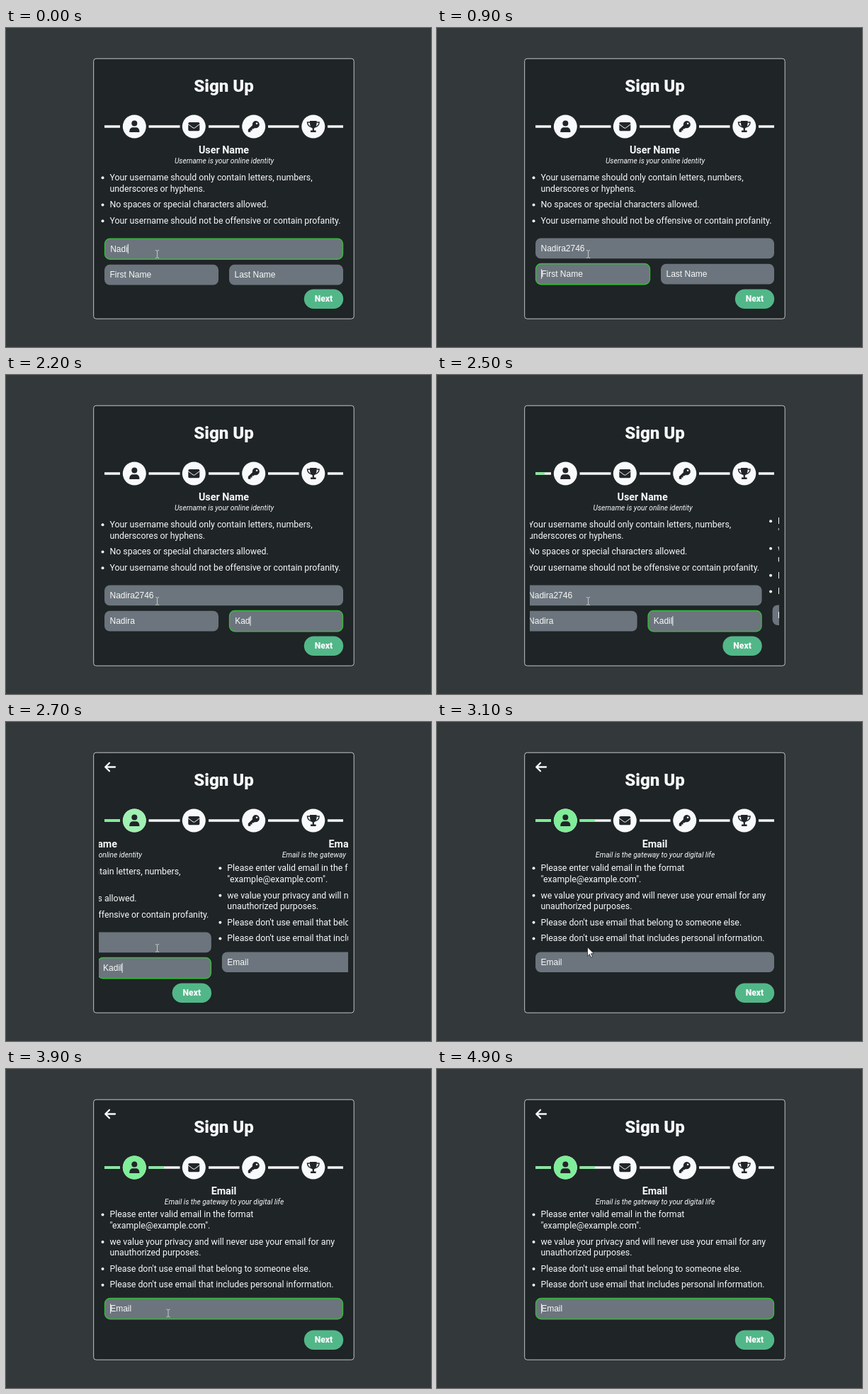
These frames come from a looping animation (600x450 px, 5000 ms). An HTML page:

```html
<!DOCTYPE html>
<html lang="en">
<head>
<meta charset="utf-8">
<title>Sign Up</title>
<style>
  html, body { margin: 0; width: 100%; height: 100%; overflow: hidden; background: #33383b; }
  svg { display: block; width: 600px; height: 450px; }
  text { font: 12.32px Roboto, "Open Sans", sans-serif; fill: #f8f9fa; white-space: pre; }
  .mid { text-anchor: middle; }
  .title { font-size: 24px; font-weight: 900; }
  .head { font-size: 14.3px; font-weight: 700; }
  .sub { font-size: 10.2px; font-style: italic; }
  .next { font-size: 12.1px; font-weight: 900; }
  .field text { font: 12px "Liberation Sans", Arial, sans-serif; }
  .field rect { fill: #6c757d; stroke-width: 1.4; }
  .icon { fill: #212529; }
</style>
</head>
<body>
<svg viewBox="0 0 600 450">
  <defs>
    <clipPath id="view"><rect x="131" y="150" width="352" height="255"/></clipPath>
    <clipPath id="done"><rect id="doneBox" x="138" y="130" height="18"/></clipPath>
    <path id="track" d="M139 139H161M201.5 139H245.5M286 139H329.5M370 139H413.5M454 139H476"/>
  </defs>
  <rect x="123.7" y="43.2" width="367.5" height="367" rx="3.5" fill="#1f2426" stroke="#c3c6c8"/>
  <text class="title mid" x="307.5" y="89.5">Sign Up</text>
  <path id="back" d="M154 63.5H140.5M146 57.7L140.2 63.5L146 69.3" fill="none" stroke="#f8f9fa" stroke-width="2.3" stroke-linecap="round" stroke-linejoin="round"/>

  <g stroke-width="3.5">
    <use href="#track" stroke="#f8f9fa"/>
    <use href="#track" stroke="#80ed99" clip-path="url(#done)"/>
  </g>
  <g fill="#f8f9fa">
    <circle cx="181.3" cy="139" r="16.5"/>
    <circle id="step" cx="181.3" cy="139" r="16.5" fill="#80ed99"/>
    <circle cx="265.3" cy="139" r="16.5"/>
    <circle cx="349.7" cy="139" r="16.5"/>
    <circle cx="433.8" cy="139" r="16.5"/>
  </g>
  <g class="icon">
    <circle cx="181.3" cy="134.6" r="4"/>
    <path d="M174.2 146.5C174.2 142 176.5 140.2 179.5 140.2H183C186.2 140.2 188.4 142 188.4 146.5Q188.4 147 187.7 147H174.9Q174.2 147 174.2 146.5Z"/>
    <rect x="257.3" y="133" width="16" height="12.2" rx="1.7"/>
    <path d="M257 135.6L264 140.8Q265.3 141.7 266.6 140.8L273.6 135.6" fill="none" stroke="#f8f9fa"/>
    <path fill-rule="evenodd" d="M352.6 131a5.1 5.1 0 1 1-1.6 9.9L349.6 142.3H347.5V144.5H345.3V146.8H341.8V143.2L347.9 137.2A5.1 5.1 0 0 1 352.6 131ZM354 133.4a1.3 1.3 0 1 0 .1 0Z"/>
    <path d="M429 131H438.6V134C438.6 138.2 437.2 140.6 434.9 141.5V144.6H437.6V147H430V144.6H432.7V141.5C430.4 140.6 429 138.2 429 134Z"/>
    <path d="M429.5 133H425.5Q425.7 138 431 139.8M438.1 133H442.1Q441.9 138 436.6 139.8" fill="none" stroke="#212529" stroke-width="1.4"/>
  </g>

  <g clip-path="url(#view)"><g id="pages"></g></g>

  <g id="pointer">
    <path id="beam" d="M-2.6-5.5Q0-5.5 0-3.8Q0-5.5 2.6-5.5M0-3.8V3.8M-2.6 5.5Q0 5.5 0 3.8Q0 5.5 2.6 5.5" fill="none" stroke="#c4c8cb"/>
    <path id="arrow" d="M-1-1.2V11.2L1.9 8.5L4 13.2L6 12.3L4 7.7H7.9Z" fill="#fff" stroke="#111" stroke-width=".7"/>
  </g>
</svg>
<script>
const $ = id => document.getElementById(id);
const LOOP = 5000, TICK = 100, PAGE = 352;
const ramp = (t, start, length) => Math.min(1, Math.max(0, (t - start) / length));
const smooth = s => s * s * (3 - 2 * s);

// A list item is a list of lines, each with its baseline and text.
const item = lines => `<circle cx="136.5" cy="${lines[0][0] - 3.7}" r="2" fill="#f8f9fa"/>` +
  lines.map(([y, s]) => `<text x="146.5" y="${y}">${s}</text>`).join('');
const page = (x, head, sub, items) => `<g transform="translate(${x})">
  <text class="head mid" x="307.5" y="177">${head}</text>
  <text class="sub mid" x="308" y="191">${sub}</text>
  <g class="list">${items.map(item).join('')}</g>
  <g class="fields"></g>
  <rect x="420.8" y="368.5" width="55.4" height="27.4" rx="13.7" fill="#52b788"/>
  <text class="next mid" x="448.5" y="386">Next</text></g>`;

$('pages').innerHTML =
  page(0, 'User Name', 'Username is your online identity', [
    [[215, 'Your username should only contain letters, numbers,'], [230.5, 'underscores or hyphens.']],
    [[253.3, 'No spaces or special characters allowed.']],
    [[276, 'Your username should not be offensive or contain profanity.']]]) +
  page(PAGE, 'Email', 'Email is the gateway to your digital life', [
    [[210, 'Please enter valid email in the format'], [225.5, '"example@example.com".']],
    [[248.5, 'we value your privacy and will never use your email for any'], [263.7, 'unauthorized purposes.']],
    [[286.5, "Please don't use email that belong to someone else."]],
    [[309.3, "Please don't use email that includes personal information."]]]);

const groups = document.querySelectorAll('.fields');
const emailList = document.querySelectorAll('.list')[1];
const set = (el, attrs) => { for (const k in attrs) el.setAttribute(k, attrs[k]); };

function makeField(group, hint) {
  group.insertAdjacentHTML('beforeend',
    '<g class="field"><rect rx="7.5"/><text></text><path stroke="#f8f9fa"/></g>');
  const [box, label, caret] = group.lastElementChild.children;
  return (x, y, w, value, focused, caretOn) => {
    const inset = focused ? 0.5 : 0;
    set(box, { x: x + inset, y: y + inset, width: w - 2 * inset,
      height: (focused ? 30.2 : 28.6) - 2 * inset, stroke: focused ? '#35bb3a' : 'none' });
    const tx = x + (focused ? 8.2 : 7.5), base = y + (focused ? 19.2 : 18.4);
    label.textContent = value || hint;
    set(label, { x: tx, y: base });
    const cx = tx + (value ? label.getComputedTextLength() : 0) + 0.4;
    set(caret, { d: `M${cx} ${base - 11}v13.5`, visibility: focused && caretOn ? 'visible' : 'hidden' });
  };
}
const user = makeField(groups[0], 'User Name'), first = makeField(groups[0], 'First Name'),
  last = makeField(groups[0], 'Last Name'), email = makeField(groups[1], 'Email');

const typed = (s, t, start) => s.slice(0, Math.max(0, Math.floor((t - start) / TICK)));

function draw(t) {
  const focus = t < 800 ? 0 : t < 1800 ? 1 : t < 3700 ? 2 : 3;
  const caretOn = t < 4200 || t >= 4700;
  const drop = focus === 0 ? 1 : 0;
  const rowY = on => (on ? 332 : 332.8) + drop;
  user(139, 296.6, 337, typed('Nadira2746', t, -400), focus === 0, caretOn);
  first(139, rowY(focus === 1), focus === 1 ? 162 : 161, typed('Nadira', t, 1000), focus === 1, caretOn);
  const lastX = focus === 1 ? 316 : 315;
  last(lastX, rowY(focus === 2), 476 - lastX, typed('Kadil', t, 1900), focus === 2, caretOn);
  email(139, focus === 3 ? 323 : 324.4, 337, '', focus === 3, caretOn);
  set(emailList, { transform: `translate(0 ${focus === 3 ? -0.9 : 0})` });

  const slide = smooth(ramp(t, 2430, 520));
  set($('pages'), { transform: `translate(${-PAGE * slide})` });
  const done = ramp(t, 2420, 520);
  set($('doneBox'), { width: done ? 1 + 84 * done : 0 });
  set($('step'), { opacity: ramp(done, 0.25, 0.4) });
  $('back').style.visibility = t >= 2600 ? 'visible' : 'hidden';

  const move = smooth(ramp(t, 3100, 500));
  const px = 213.5 + 15.5 * move, py = 319 + 25.5 * move;
  const isArrow = slide > 0.75 && py < 324;
  set($('pointer'), { transform: `translate(${px} ${py})` });
  $('pointer').style.visibility = t < 4900 ? 'visible' : 'hidden';
  $('beam').style.display = isArrow ? 'none' : '';
  $('arrow').style.display = isArrow ? '' : 'none';
}

let begin;
function tick(now) {
  begin ??= now;
  draw(Math.floor((now - begin) % LOOP / TICK) * TICK);
  requestAnimationFrame(tick);
}
draw(0);
requestAnimationFrame(tick);
</script>
</body>
</html>
```
